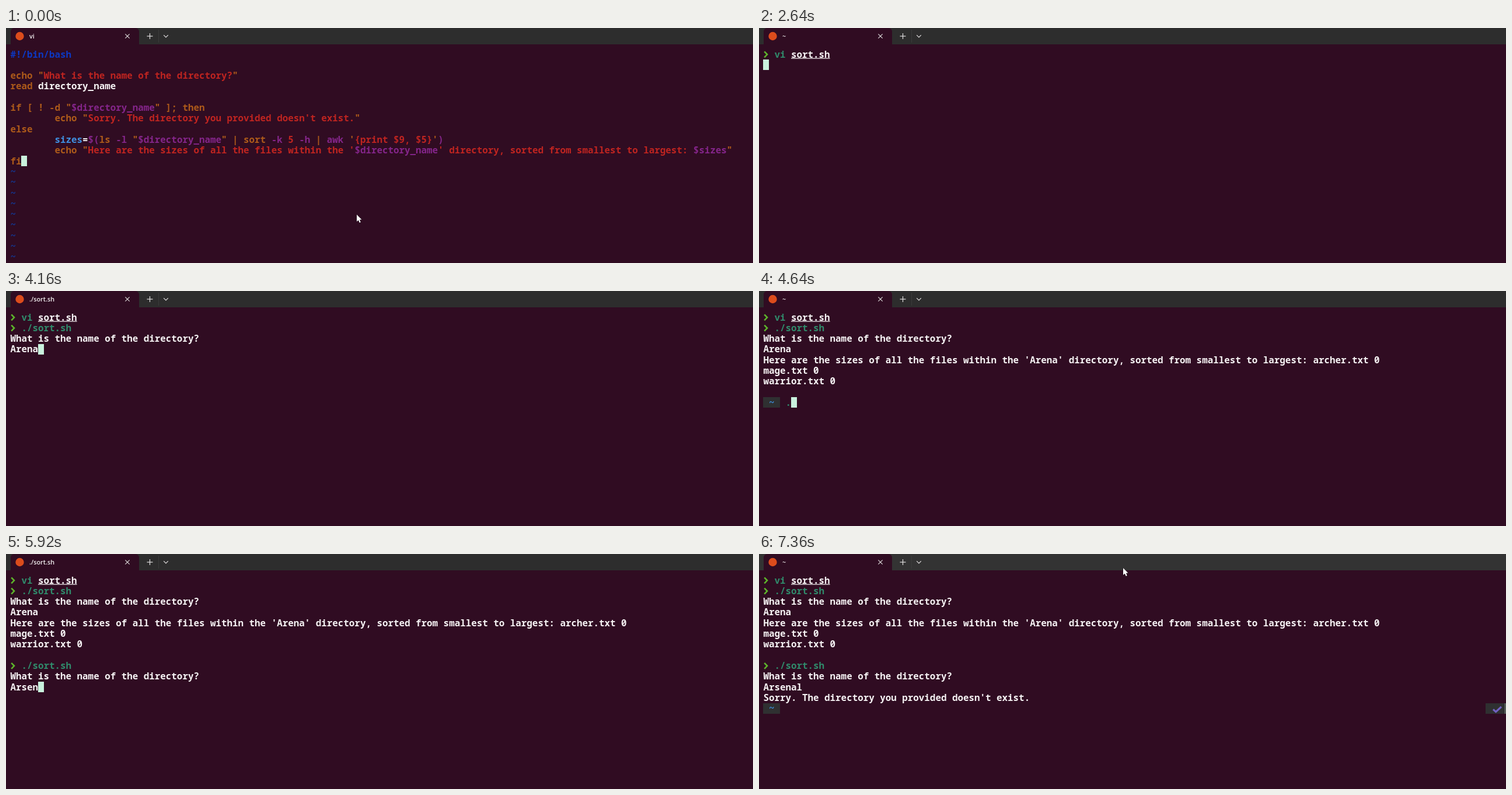
Animation, 1280 px wide and 403 px high, one loop 7520 ms. Source, as an HTML page with a canvas:

```html
<!DOCTYPE html>
<html lang="en">
<head>
<meta charset="utf-8">
<title>Sorting script in a terminal</title>
<style>
html, body { margin: 0; width: 100%; height: 100%; overflow: hidden; background: #300c22; }
canvas { display: block; }
</style>
</head>
<body>
<canvas id="stage" width="1280" height="403"></canvas>
<script>
const ctx = document.getElementById('stage').getContext('2d');
const LOOP = 7520, STEP = 80;
const LEFT = 7.4, TOP = 36, COL = 9.516, ROW = 18.31;
const BG = '#300c22', SEGMENT = '#2f3031', CURSOR = '#c9f1dd';
const COLORS = {
  w: '#f5f2f3', b: '#0d38c2', t: '#123a98', o: '#ad5a1a', r: '#be2420',
  p: '#84258a', c: '#3f8fe0', g: '#308a6b'
};

// "§x" switches to colour x of COLORS.
const SCRIPT = [
  '§b#!/bin/bash',
  '',
  '§oecho "§rWhat is the name of the directory?§o"',
  '§oread §wdirectory_name',
  '',
  '§oif [ ! -d "§p$directory_name§o" ]; then',
  '§o        echo "§rSorry. The directory you provided doesn\'t exist.§o"',
  '§oelse',
  '§c        sizes§w=§p$(§ols §p-l §o"§p$directory_name§o" | sort §p-k §r5 §p-h §o| §pawk §o\'§r{print $9, $5}§o\'§p)',
  '§o        echo "§rHere are the sizes of all the files within the \'§p$directory_name§r\' directory, sorted from smallest to largest: §p$sizes§o"',
  '§ofi'
];
const QUESTION = 'What is the name of the directory?';
const RESULT = [
  "Here are the sizes of all the files within the 'Arena' directory, sorted from smallest to largest: archer.txt 0",
  'mage.txt 0',
  'warrior.txt 0'
];
const COMMAND = './sort.sh';

const colX = col => LEFT + col * COL;
const rowY = row => TOP + row * ROW;
const typed = (text, times, t) => text.slice(0, times.filter(at => t >= at).length);

function rect(x, y, w, h, color) {
  ctx.fillStyle = color;
  ctx.fillRect(x, y, w, h);
}

function stroke(points, color, width) {
  ctx.beginPath();
  points.forEach(([x, y]) => ctx.lineTo(x, y));
  ctx.strokeStyle = color;
  ctx.lineWidth = width;
  ctx.stroke();
}

function write(row, markup, col = 0) {
  ctx.font = '600 15.86px "Noto Sans Mono", monospace';
  let color = COLORS.w;
  markup.split(/(§.)/).forEach(part => {
    if (part[0] === '§') { color = COLORS[part[1]]; return; }
    ctx.fillStyle = color;
    ctx.fillText(part, colX(col), rowY(row) + 14.5);
    col += part.length;
  });
}

function block(row, col) {
  rect(Math.round(colX(col)), Math.round(rowY(row)), 10, 18, CURSOR);
}

function drawTabBar(title, bar) {
  rect(0, 0, 1280, 28, bar);
  ctx.fillStyle = BG;
  ctx.beginPath();
  ctx.roundRect(8, 0, 220, 28, [6, 6, 0, 0]);
  ctx.fill();
  ctx.fillStyle = '#dc4c1c';
  ctx.beginPath();
  ctx.arc(23.5, 14, 7.2, 0, 2 * Math.PI);
  ctx.fill();
  ctx.font = '600 10.8px "Open Sans", sans-serif';
  ctx.fillStyle = '#f4f1f2';
  ctx.fillText(title, 40, 18);
  const light = '#e2dfe0';
  stroke([[204.3, 10.3], [211.7, 17.7]], light, 1.1);
  stroke([[211.7, 10.3], [204.3, 17.7]], light, 1.1);
  stroke([[241.5, 14], [251.5, 14]], light, 1.2);
  stroke([[246.5, 9], [246.5, 19]], light, 1.2);
  stroke([[261.5, 3], [261.5, 25]], '#3b3b3b', 1);
  stroke([[270.2, 12.2], [274, 16], [277.8, 12.2]], light, 1.2);
}

function drawPointer(x, y) {
  const shape = [[0, 0], [0, 12], [2.8, 9.5], [4.8, 14], [6.8, 13.1], [4.9, 8.7], [8.5, 8.5]];
  ctx.beginPath();
  shape.forEach(([dx, dy]) => ctx.lineTo(x + dx, y + dy));
  ctx.closePath();
  ctx.strokeStyle = '#160811';
  ctx.lineWidth = 1;
  ctx.stroke();
  ctx.fillStyle = '#fff';
  ctx.fill();
}

function drawEditor(t) {
  SCRIPT.forEach((line, row) => write(row, line));
  for (let row = SCRIPT.length; row < 20; row++) write(row, '§t~');
  if (t < 320) {
    block(10, t < 160 ? 2 : 1);
    if (t >= 160) write(10, '§oi', 1);
  }
}

function drawEntered(row, markup) {
  const y = rowY(row);
  stroke([[9.2, y + 4.3], [14, y + 9.3], [9.2, y + 14.3]], '#5db32b', 2.6);
  write(row, markup, 2);
}

function drawPrompt(row, input, showCheck, showCursor) {
  const y = Math.round(rowY(row));
  rect(7, y, 29, 18, SEGMENT);
  write(row, '§c~', 1);
  write(row, '§g' + input, 4);
  if (showCheck) {
    rect(1245, y, 35, 18, SEGMENT);
    stroke([[1258, y + 10.5], [1262.6, y + 14.6], [1272, y + 6]], '#7260c2', 3.2);
    rect(1278, y, 1, 18, '#89978c');
  }
  if (showCursor) block(row, 4 + input.length);
}

function drawAnswer(row, text, waiting) {
  write(row, text);
  if (waiting) block(row, text.length);
}

function drawShell(t) {
  drawEntered(0, '§gvi');
  write(0, 'sort.sh', 5);
  rect(colX(5), 51.5, 7 * COL, 1.2, COLORS.w);

  if (t < 2800) return block(1, 0);
  if (t < 3520) {
    const input = t >= 3440 ? COMMAND : typed(COMMAND, [3200, 3280, 3360], t);
    return drawPrompt(1, input, true, true);
  }
  drawEntered(1, '§g' + COMMAND);
  if (t < 3600) return block(2, 0);
  write(2, QUESTION);
  drawAnswer(3, typed('Arena', [3840, 3920, 4000, 4080, 4160], t), t < 4320);

  if (t < 4320) return;
  RESULT.forEach((line, i) => write(4 + i, line));
  if (t < 4400) return block(8, 0);
  if (t < 4960) {
    const input = t >= 4880 ? COMMAND : typed(COMMAND, [4640, 4720, 4800], t);
    return drawPrompt(8, input, false, true);
  }
  drawEntered(8, '§g' + COMMAND);
  write(9, QUESTION);
  drawAnswer(10, typed('Arsenal', [5440, 5520, 5680, 5760, 5920, 6000, 6160], t), t < 6400);

  if (t < 6400) return;
  write(11, "Sorry. The directory you provided doesn't exist.");
  if (t < 6480) return block(12, 0);
  drawPrompt(12, '', true, t < 7200);
}

function pointerAt(t) {
  if (t < 160) return [601, 320];
  if (t < 6880) return null;
  if (t < 7120) {
    const k = (t - 6880) / 240;
    return [606 + 16 * k, 235 - 216 * k];
  }
  const k = Math.min(1, (t - 7120) / 240);
  return [622 + 2 * k, 19 + 5 * k];
}

function titleAt(t) {
  if (t < 2640) return 'vi';
  const running = (t >= 3520 && t < 4320) || (t >= 4960 && t < 6400);
  return running ? COMMAND : '~';
}

function draw(now) {
  const t = Math.floor((now % LOOP) / STEP) * STEP;
  rect(0, 0, 1280, 403, BG);
  drawTabBar(titleAt(t), t >= 7040 ? '#333333' : '#2d2d2d');
  if (t < 2640) drawEditor(t);
  else drawShell(t);
  const pointer = pointerAt(t);
  if (pointer) drawPointer(...pointer);
}

const start = performance.now();
function tick() {
  draw(performance.now() - start);
  requestAnimationFrame(tick);
}
tick();
</script>
</body>
</html>
```
